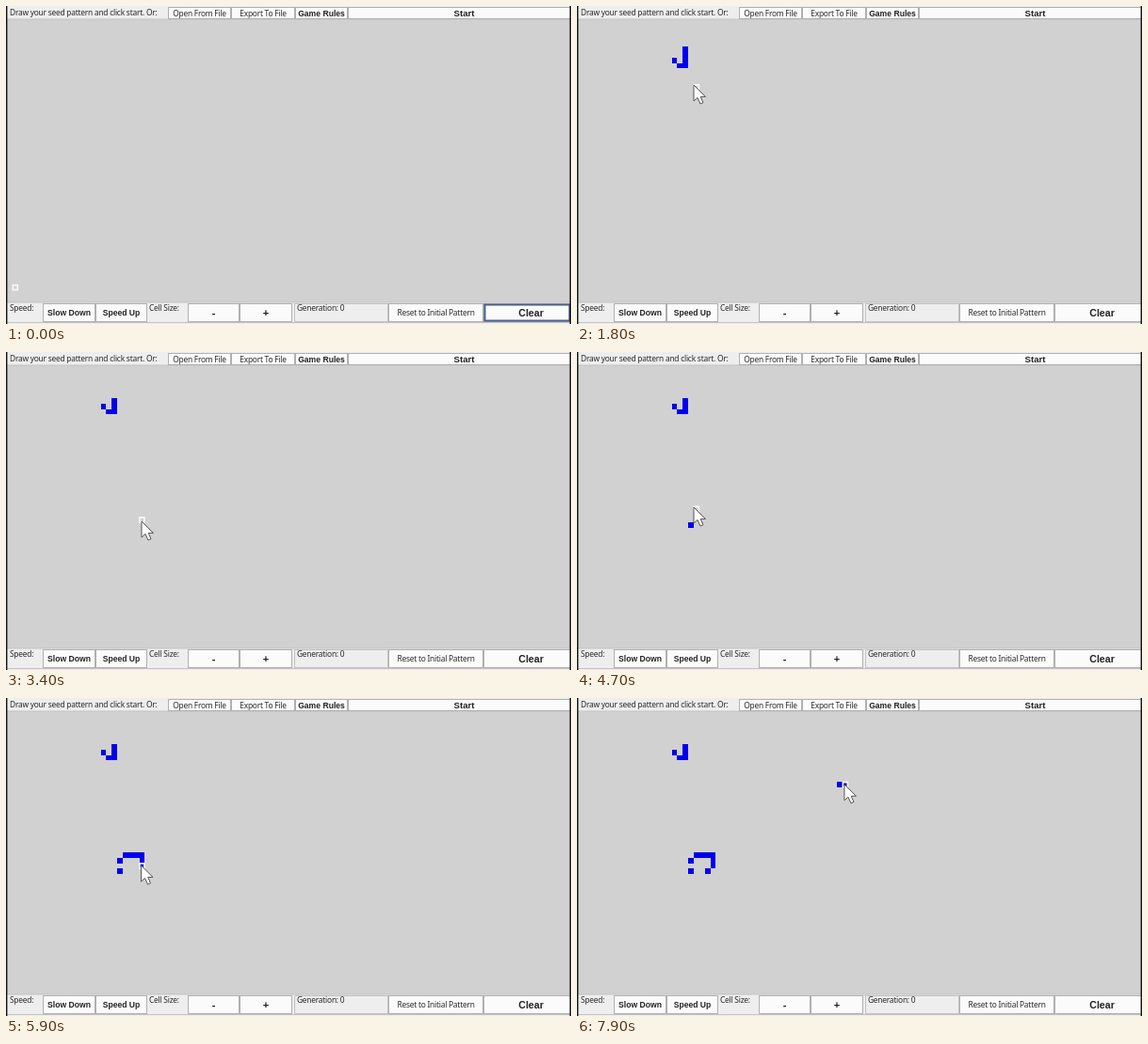
These frames come from a looping animation (600 by 338 pixels, 8000 ms). An HTML page:

```html
<!DOCTYPE html>
<html>
<head>
<meta charset="utf-8">
<style>
  html, body { margin: 0; width: 100%; height: 100%; overflow: hidden; background: #d1d1d1; }
  svg { display: block; width: 600px; height: 338px; }
  text { font: 8.4px "Noto Sans", "Open Sans", sans-serif; letter-spacing: -.23px; fill: #2a2a2a; }
  text.bold { font-family: "Liberation Sans", sans-serif; font-weight: bold; letter-spacing: 0; fill: #222; }
</style>
</head>
<body>
<svg viewBox="0 0 600 338">
  <rect width="600" height="338" fill="#d1d1d1"/>
  <g id="ui">
    <path d="M0 0H600V14H0ZM0 315H600V338H0Z" fill="#eee"/>
    <path d="M0 14H600M0 315H600M0 336.5H600" stroke="#c2c2c2"/>
    <rect x="306.5" y="316.5" width="99" height="19" fill="#eee" stroke="#c2c2c2"/>
  </g>
  <rect id="focus" x="508.5" y="317.5" width="90" height="17" fill="none" stroke="#4d618c" stroke-width="2"/>
  <path d="M.7 0V338M599.3 0V338" stroke="#111" stroke-width="1.4"/>
  <path id="cells" fill="#0000ea" shape-rendering="crispEdges"/>
  <rect id="hover" width="5" height="5" fill="none" stroke="#fafafa" stroke-width="1.6"/>
  <path id="cursor" d="M0 0V17L4 13.4L7 20L10 18.7L7.2 12.4H12.5Z" fill="#fff" stroke="#555"/>
</svg>
<script>
const $ = id => document.getElementById(id);

function add(tag, attrs, content = '') {
  const el = document.createElementNS('http://www.w3.org/2000/svg', tag);
  for (const k in attrs) el.setAttribute(k, attrs[k]);
  el.textContent = content;
  $('ui').append(el);
}

function button(left, right, top, bottom, text, boldSize) {
  const size = boldSize || 8.4;
  add('rect', { x: left + .5, y: top + .5, width: right - left - 1, height: bottom - top - 1,
                fill: '#fbfbfb', stroke: '#b0b0b0' });
  add('text', { x: (left + right) / 2, y: (top + bottom) / 2 + size * .4, 'text-anchor': 'middle',
                class: boldSize ? 'bold' : '', style: `font-size:${size}px` }, text);
}

const topButton = (l, r, text, size) => button(l, r, 1, 14, text, size);
const lowButton = (l, r, text, size) => button(l, r, 316, 336, text, size);
const label = (x, y, text) => add('text', { x, y }, text);

label(4, 9.7, 'Draw your seed pattern and click start. Or:');
topButton(172, 239, 'Open From File');
topButton(239, 307, 'Export To File');
topButton(307, 363, 'Game Rules', 8.6);
topButton(363, 610, 'Start', 9.6);
label(4, 324, 'Speed:');
lowButton(39, 95, 'Slow Down', 8.6);
lowButton(95, 150, 'Speed Up', 8.6);
label(152, 324, 'Cell Size:');
lowButton(193, 248, '-', 11);
lowButton(248, 304, '+', 11);
label(309, 324, 'Generation: 0');
lowButton(406, 507, 'Reset to Initial Pattern');
lowButton(507, 608, 'Clear', 10.6);

const STEP = 100, DX = 5.85, DY = 5.75, X0 = 1.1, Y0 = 14.5;
const MOVES = { U: [0, -1], D: [0, 1], R: [1, 0], '/': [1, -1], '\\': [1, 1] };
const path = [], toggles = [];

const go = (t, x, y) => path.push({ t, x, y });
const rest = t => path.push({ ...path.at(-1), t });

// Toggle a cell, then one neighbour per step along the given moves
function stroke(t, col, row, moves = '') {
  for (const move of ['', ...moves]) {
    const [dc, dr] = MOVES[move] || [0, 0];
    col += dc;
    row += dr;
    go(t, X0 + (col + .35) * DX, Y0 + (row + .45) * DY);
    toggles.push({ t, key: `${col},${row}` });
    t += STEP;
  }
}

go(100, 557, 322);
go(900, 106, 56);
stroke(1100, 17, 7, '\\RUUU');
go(1800, 124, 84);
stroke(2100, 19, 5);
go(2500, 143, 197);
go(2700, 130, 184);
go(3400, 144, 180);
rest(4000);
stroke(4400, 20, 29);
go(4700, 124, 165);
rest(4900);
stroke(5100, 20, 27, '/RRRDD');
rest(6200);
stroke(6400, 23, 29);
go(6600, 160, 228);
go(6900, 288, 170);
go(7100, 277, 110);
stroke(7300, 47, 13);
rest(7600);
go(7700, 289, 98);
stroke(7900, 48, 13);

function pointer(t) {
  const i = path.findIndex(p => p.t >= t);
  if (i < 1) return path[0];
  const a = path[i - 1], b = path[i], k = (t - a.t) / (b.t - a.t);
  return { x: a.x + (b.x - a.x) * k, y: a.y + (b.y - a.y) * k };
}

function draw(now) {
  const t = Math.floor(now % 8000 / STEP) * STEP;
  const { x, y } = pointer(t);
  const live = new Set();
  for (const { key } of toggles.filter(c => c.t <= t)) live.delete(key) || live.add(key);
  $('cells').setAttribute('d', [...live].map(key => {
    const [c, r] = key.split(',');
    return `M${X0 + c * DX} ${Y0 + r * DY}h${DX}v${DY}h${-DX}z`;
  }).join(''));

  const onGrid = t > 0 && y < 314;
  const col = onGrid ? Math.floor((x - X0) / DX) : 1;
  const row = onGrid ? Math.floor((y - Y0) / DY) : 49;
  $('hover').setAttribute('x', X0 + col * DX + .4);
  $('hover').setAttribute('y', Y0 + row * DY + .4);
  $('cursor').setAttribute('transform', `translate(${x} ${y})`);
  $('cursor').setAttribute('visibility', t > 0 ? 'visible' : 'hidden');
  $('focus').setAttribute('visibility', t < 200 ? 'visible' : 'hidden');
}

const start = performance.now();
function loop() {
  draw(performance.now() - start);
  requestAnimationFrame(loop);
}
loop();
</script>
</body>
</html>
```
